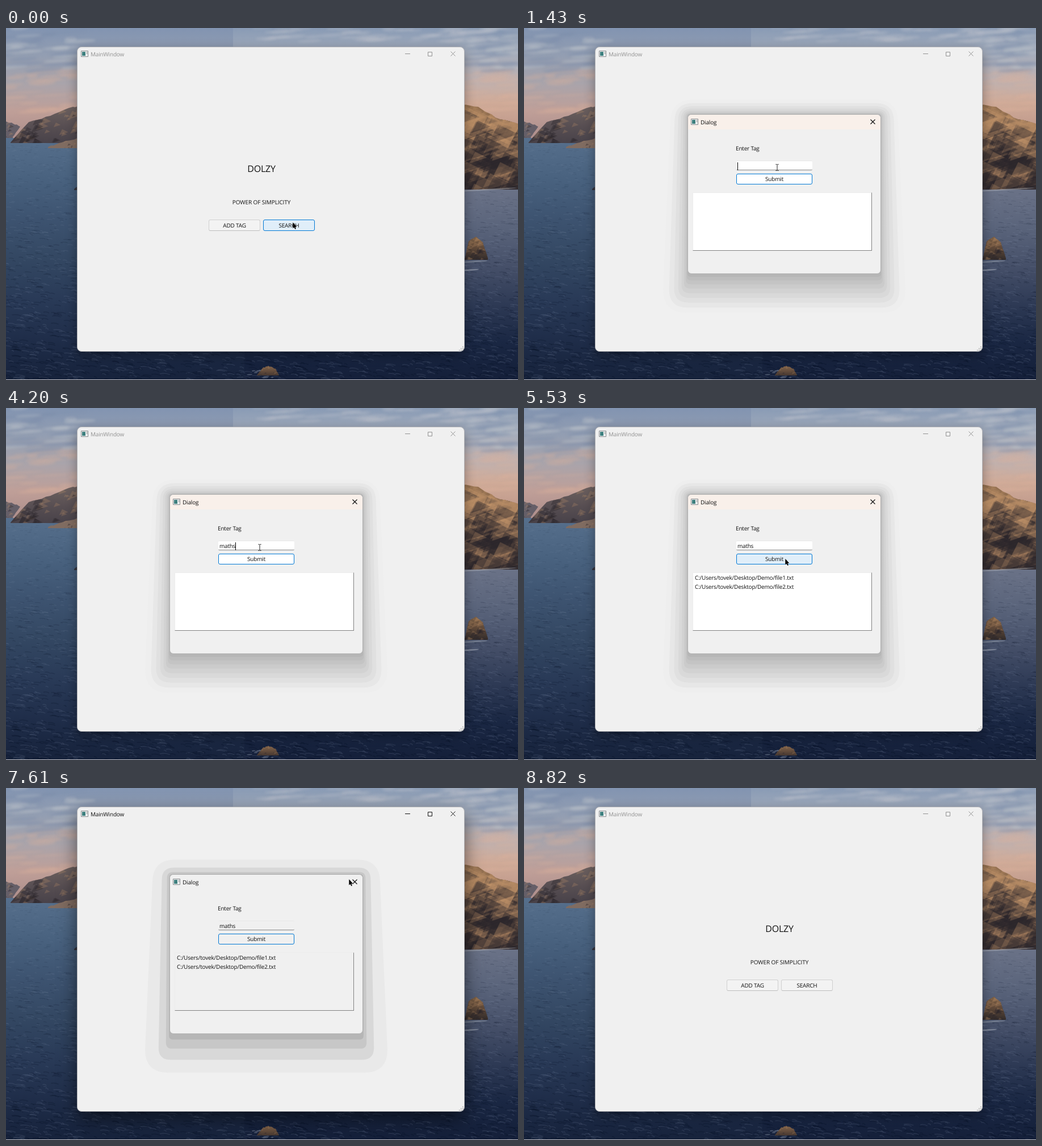
An HTML page with a canvas for the animation above (8960 ms loop, 902 by 621 pixels).

```html
<!DOCTYPE html>
<html lang="en">
<head>
<meta charset="utf-8">
<title>Tag search demo</title>
<style>
  html, body { margin: 0; width: 100%; height: 100%; overflow: hidden; background: #24344f; }
  #stage {
    position: relative; width: 902px; height: 621px; overflow: hidden;
    font: 10px/16px "Open Sans", "Noto Sans", sans-serif;
    letter-spacing: -.018em; color: #111; text-rendering: geometricPrecision;
  }
  #stage div, #stage svg, canvas { position: absolute; box-sizing: border-box; }
  svg { overflow: visible; fill: none; }
  .label { white-space: nowrap; }
  .center { left: 224px; width: 200px; text-align: center; letter-spacing: -.01em; }
  .anim { animation: 8.96s step-end infinite; }

  #main {
    left: 125px; top: 33px; width: 683px; height: 538px;
    border: 1px solid #b4b5b8; border-radius: 8px; background: #f0f0f0;
    animation-name: focus;
  }
  #main > .label, #main > .button { color: #111; }
  #main > .caption { color: inherit; }
  .button {
    width: 91px; height: 20px; border: 1px solid #d0d0d0; border-bottom-color: #bcbcbc; border-radius: 3px;
    background: #f3f3f3; text-align: center; line-height: 18px;
  }
  #main > .button { top: 304px; }
  #search { animation-name: search; }

  #dialog { left: 288px; top: 152px; width: 341px; height: 282px; animation-name: dialog; }
  #panel {
    inset: 0; overflow: hidden; background: #f0f0f0;
    border: 1px solid #b0b0b0; border-radius: 7px;
  }
  #bar { left: 0; top: 0; width: 339px; height: 26px; background: var(--bar); }
  #close { left: 313px; top: 1px; width: 28px; height: 25px; border-radius: 0 6px 0 0; animation-name: close; }
  #field {
    left: 85px; top: 81px; width: 134px; height: 17px; padding-left: 2px; line-height: 17px;
    background: var(--paper); border: solid #e8e8e8; border-width: 1px 0;
    border-bottom-color: #868686; border-radius: 2px; white-space: nowrap;
  }
  #field span { letter-spacing: -.025em; }
  #caret {
    display: inline-block; width: 1px; height: 14px; margin-right: -1px;
    background: #000; vertical-align: middle; animation-name: caret;
  }
  #submit { left: 85px; top: 104px; width: 134px; height: 19px; line-height: 17px; animation-name: submit; }
  #list {
    left: 8px; top: 137px; width: 316px; height: 103px; background: var(--paper);
    border: 1px solid #ececec; border-right-color: #828282; border-bottom-color: #828282;
  }
  #results { left: 3px; top: 0; animation-name: results; }
  #fine { animation-name: fine; }
  #coarse { animation-name: coarse; }

  #arrow { left: 0; top: 0; animation-name: arrow; }
  #beam { left: 446px; top: 246px; animation-name: beam; }
  #slip { animation-name: slip; }
  /* a key lands 38% into its own cycle, shifted to the moment --at */
  .key { animation-name: key; animation-delay: calc(var(--at) - 3405ms); }

  @keyframes focus {
    0%, 3.01%, 98.43%, to { color: #929292; box-shadow: 0 6px 20px #0005; }
    1.45%, 84.93% { color: #111; box-shadow: 0 12px 32px #0008; }
  }
  @keyframes search {
    0% { background: #e0eef9; border-color: #0078d4; }
    1.45% { background: #cce4f7; border-color: #005499; }
    5.69%, to { background: #f3f3f3; border-color: #d0d0d0 #d0d0d0 #bcbcbc; }
  }
  @keyframes dialog {
    0%, 87.72%, to { visibility: hidden; }
    3.01% { visibility: visible; opacity: .5; transform: scale(.92); --paper: #f0f0f0; --bar: #f0f0f0; }
    4.35% { visibility: visible; opacity: 1; transform: translate(-1.5px, -.5px) scale(.974); --paper: #f0f0f0; --bar: #f2f0ed; }
    5.69% { visibility: visible; opacity: 1; transform: none; --paper: #fff; --bar: #f9f0ea; }
    84.93% { visibility: visible; opacity: 1; transform: none; --paper: #f0f0f0; --bar: #f0f0f0; }
    86.27% { visibility: visible; opacity: .4; transform: scale(.95); --paper: #f0f0f0; --bar: #f0f0f0; }
  }
  @keyframes fine { 0%, 84.93%, to { opacity: 0; } 5.69% { opacity: 1; } }
  @keyframes coarse { 0%, 84.93%, to { opacity: 1; } 5.69% { opacity: 0; } }
  @keyframes submit {
    0%, 13.05%, 79.24%, to { background: var(--paper); border-color: #0078d4; }
    11.71%, 48.54%, 59.04% { background: #e0eef9; border-color: #0078d4; }
    57.7% { background: #cce4f7; border-color: #005499; }
  }
  @keyframes close {
    0%, 84.93%, to { background: transparent; color: #111; }
    80.58% { background: #c42b1c; color: #fff; }
    83.37% { background: #c84031; color: #f0d5d2; }
  }
  @keyframes caret { 0%, 22.2%, 53.23%, to { opacity: 0; } 15.95%, 25.33% { opacity: 1; } }
  @keyframes slip { 0%, 28.45%, to { font-size: 0; } 25.33% { font-size: 10px; } }
  @keyframes key { 0% { font-size: 0; } 38%, to { font-size: 10px; } }
  @keyframes results { 0% { opacity: 0; } 59.04%, to { opacity: 1; } }
  @keyframes beam {
    0%, 48.54%, to { opacity: 0; transform: none; }
    13.05% { opacity: 1; transform: none; }
    46.87% { opacity: 1; transform: translateX(1px); }
  }
  @keyframes arrow {
    0% { transform: translate(505px, 343px); visibility: visible; }
    10.37% { transform: translate(505px, 343px); animation-timing-function: steps(3, start); }
    14.4% { transform: translate(446px, 246px); visibility: hidden; }
    48.54% { transform: translate(448px, 250px); visibility: visible; animation-timing-function: steps(2, start); }
    51.3% { transform: translate(460px, 266px); }
    77.9% { transform: translate(460px, 266px); animation-timing-function: steps(3, start); }
    81.9% { transform: translate(604px, 161px); }
    89.28% { transform: translate(637px, 224px); }
    90.95% { transform: translate(752px, 370px); }
    92.29% { transform: translate(692px, 490px); visibility: visible; }
    93.97% { transform: translate(692px, 509px); visibility: visible; }
    95.42%, to { transform: translate(692px, 509px); visibility: hidden; }
  }
</style>
</head>
<body>
<div id="stage">
  <canvas id="scene" width="902" height="621"></canvas>

  <svg width="0" height="0">
    <symbol id="app" viewBox="0 0 13 11">
      <path d="M.5 .5H12.5V10.5H.5Z" fill="#f4f5f5" stroke="#85898c"/>
      <path d="M2 2H8V9H2Z" fill="#3f807f"/>
      <path d="M10.5 2V6" stroke="#85898c"/>
    </symbol>
  </svg>

  <div id="main" class="anim">
    <svg style="left:6px;top:6px" width="13" height="11"><use href="#app"/></svg>
    <div class="label caption" style="left:23px;top:4px">MainWindow</div>
    <svg width="1" height="1" style="left:0;top:0" stroke="currentColor">
      <path d="M577 11.5h9M617.5 8.5h7v7h-7zM657.5 7.5l8 8m0-8l-8 8"/>
    </svg>
    <div class="label center" style="top:202px;font-size:16px;line-height:24px">DOLZY</div>
    <div class="label center" style="top:265px">POWER OF SIMPLICITY</div>
    <div class="button" style="left:231px">ADD TAG</div>
    <div id="search" class="button anim" style="left:327px">SEARCH</div>
    <svg width="1" height="1" style="left:0;top:0" stroke="#a8a8a8" stroke-width="1.6">
      <path d="M672 534.5h8M675 531.5h5M678 528.5h2" stroke-dasharray="1.6 1.4"/>
    </svg>
  </div>

  <div id="dialog" class="anim">
    <svg width="341" height="282" style="left:0;top:0">
      <g id="fine" class="anim"></g>
      <g id="coarse" class="anim"></g>
    </svg>
    <div id="panel">
      <div id="bar"></div>
      <svg style="left:5px;top:7px" width="13" height="11"><use href="#app"/></svg>
      <div class="label" style="left:22px;top:5px">Dialog</div>
      <div class="label" style="left:84px;top:51px">Enter Tag</div>
      <div id="field"><span id="slip" class="anim">a</span><span class="anim key" style="--at:2820ms">m</span><span class="anim key" style="--at:2970ms">a</span><span class="anim key" style="--at:3090ms">t</span><span class="anim key" style="--at:3650ms">hs</span><i id="caret" class="anim"></i></div>
      <div id="submit" class="button anim">Submit</div>
      <div id="list">
        <div id="results" class="label anim">C:/Users/tovek/Desktop/Demo/file1.txt<br>C:/Users/tovek/Desktop/Demo/file2.txt</div>
      </div>
    </div>
    <div id="close" class="anim">
      <svg width="28" height="25" style="left:0;top:0" stroke="currentColor" stroke-width="1.2"><path d="M9.5 8.5l8 8m0-8l-8 8"/></svg>
    </div>
  </div>

  <svg id="beam" class="anim" width="1" height="1" stroke="#222">
    <path d="M-2.5 -5.5h2m1 0h2M0 -5V5M-2.5 5.5h2m1 0h2"/>
  </svg>
  <svg id="arrow" class="anim" width="1" height="1">
    <path d="M.3 0V10.6L2.6 8.4L4.2 12L5.9 11.3L4.3 7.7H7.4Z" fill="#000" stroke="#fff" stroke-width=".6" paint-order="stroke"/>
  </svg>
</div>

<script>
  // Dialog shadow: nested bands that shrink towards the panel as they darken.
  function band(d, grey) {
    const l = -d, r = 341 + d, t = -.6 * d, b = 282 + 10.4 * Math.sqrt(d);
    const s = .3 * d, c = 6 + .8 * d;
    return `<path fill="rgb(${grey},${grey},${grey})" d="M${l + s + c} ${t}H${r - s - c}
      Q${r - s} ${t} ${r - s} ${t + c}L${r} ${b - c}Q${r} ${b} ${r - c} ${b}
      H${l + c}Q${l} ${b} ${l} ${b - c}L${l + s} ${t + c}Q${l + s} ${t} ${l + s + c} ${t}Z"/>`;
  }
  function shadow(id, count, grey, step, falloff) {
    document.getElementById(id).innerHTML = Array.from({ length: count }, (_, i) =>
      band(43 * (1 - i / count) ** falloff, grey - step * i)).join('');
  }
  shadow('fine', 9, 238, 7, 2.4);
  shadow('coarse', 4, 233, 17, 2.8);

  // Coastal backdrop
  const g = document.getElementById('scene').getContext('2d');
  let seed = 7;
  const rnd = (a = 0, b = 1) => a + (b - a) * (seed = seed * 16807 % 2147483647) / 2147483647;

  function gradient(y0, y1, ...colors) {
    const grad = g.createLinearGradient(0, y0, 0, y1);
    colors.forEach((c, i) => grad.addColorStop(i / (colors.length - 1), c));
    return grad;
  }
  function rect(style, x, y, w, h) {
    g.fillStyle = style;
    g.fillRect(x, y, w, h);
  }
  function wisp(x, y, rx, ry, style) {
    g.fillStyle = style;
    g.beginPath();
    g.ellipse(x, y, rx, ry, -.06, 0, 7);
    g.fill();
  }

  // A jagged skyline through a few points, with random facets inside.
  function ridge(style, base, rough, facets, ...points) {
    const [x0] = points[0], [x1] = points.at(-1);
    const top = Math.min(...points.map(p => p[1]));
    g.save();
    g.beginPath();
    g.moveTo(x0, base);
    points.forEach(([x, y], i) => {
      const [px, py] = points[i - 1] || [x, y];
      for (let u = .2; u < 1; u += .2)
        g.lineTo(px + (x - px) * u, py + (y - py) * u + rnd(-rough, rough));
      g.lineTo(x, y);
    });
    g.lineTo(x1, base);
    g.fillStyle = style;
    g.fill();
    g.clip();
    for (let i = 0; i < facets; i++) {
      const y = rnd(top, base), x = rnd(x0, x1), size = rnd(.03, .12) * (base - top);
      g.fillStyle = rnd(top, base) < y ? '#2c262b66' : '#c1946a3d';
      g.beginPath();
      g.moveTo(x, y);
      g.lineTo(x + size * 2, y + size);
      g.lineTo(x - size, y + size * 2);
      g.fill();
    }
    g.restore();
  }

  rect(gradient(0, 195, '#8294b1', '#939eb2', '#a9a4ab', '#bf9f98', '#ad8e8b'), 0, 0, 400, 195);
  rect(gradient(0, 175, '#899bb5', '#a3acbc', '#bdb2b3', '#d0ab98', '#c09a8c'), 400, 0, 502, 175);
  g.filter = 'blur(2px)';
  for (let i = 0; i < 60; i++) {
    const y = rnd(0, 150);
    const tint = y > 75 ? '#dcb09c55' : rnd() < .5 ? '#7c8dab66' : '#c3c7ce66';
    wisp(rnd(-20, 130), y, rnd(10, 40), rnd(1, 4), tint);
    wisp(rnd(790, 910), y, rnd(10, 40), rnd(1, 4), tint);
    wisp(rnd(450, 900), rnd(0, 24), rnd(10, 30), rnd(1, 3), '#c3c7ce55');
  }
  g.filter = 'none';

  rect(gradient(194, 621, '#566f8c', '#49627f', '#3d5370', '#334762', '#293a57', '#1f2d49', '#16223b'), 0, 194, 420, 427);
  rect(gradient(284, 621, '#6a7287', '#5a647b', '#465069', '#2e3a55', '#1a2743', '#141f39'), 420, 194, 482, 427);

  // Ripples grow and deepen towards the viewer
  for (let i = 0; i < 5000; i++) {
    const x = rnd(-10, 902), y = rnd(x > 800 ? 288 : 200, 620), near = (y - 190) / 430;
    const len = rnd(3, 7 + 12 * near);
    g.strokeStyle = rnd() < .55 ? `rgba(8,18,38,${.1 + .2 * near})` : 'rgba(150,164,188,.14)';
    g.lineWidth = .6 + near;
    g.beginPath();
    g.moveTo(x, y);
    g.quadraticCurveTo(x + len / 2, y - 2 * near, x + len, y + 2 * near);
    g.stroke();
  }

  ridge('#655f68', 194, 1, 12, [-5, 164], [10, 167], [25, 174], [12, 192]);
  ridge(gradient(138, 210, '#6d615f', '#574e52', '#453f47'), 203, 1, 60,
    [8, 202], [40, 166], [78, 155], [118, 139], [135, 139]);
  ridge('#806c61', 212, 1, 12, [74, 210], [98, 202], [135, 192]);
  ridge('#34343d', 286, 1, 0, [120, 284], [130, 278]);

  ridge(gradient(135, 286, '#94704f', '#8d6c51', '#7d604c', '#624b40', '#473a38'), 285, 1.5, 260,
    [795, 134], [832, 139], [862, 158], [905, 170]);
  wisp(850, 285, 50, 1.2, '#a9abb388');

  ridge(gradient(367, 410, '#7d6045', '#5e4838', '#302a2a'), 409, 1, 40,
    [808, 408], [815, 376], [828, 368], [840, 378], [849, 406]);
  wisp(824, 412, 24, 1.5, '#8f98a888');
  wisp(816, 427, 17, 1.3, '#b3bac588');

  for (let i = 0; i < 20; i++) wisp(rnd(428, 478), rnd(604, 617), rnd(2, 9), 1, '#9aa6b666');
  ridge(gradient(596, 614, '#86664a', '#43352f'), 613, 1, 16, [442, 612], [452, 600], [462, 596], [475, 601], [481, 612]);
  rect('#c9c7cc', 0, 620, 902, 1);
</script>
</body>
</html>
```
